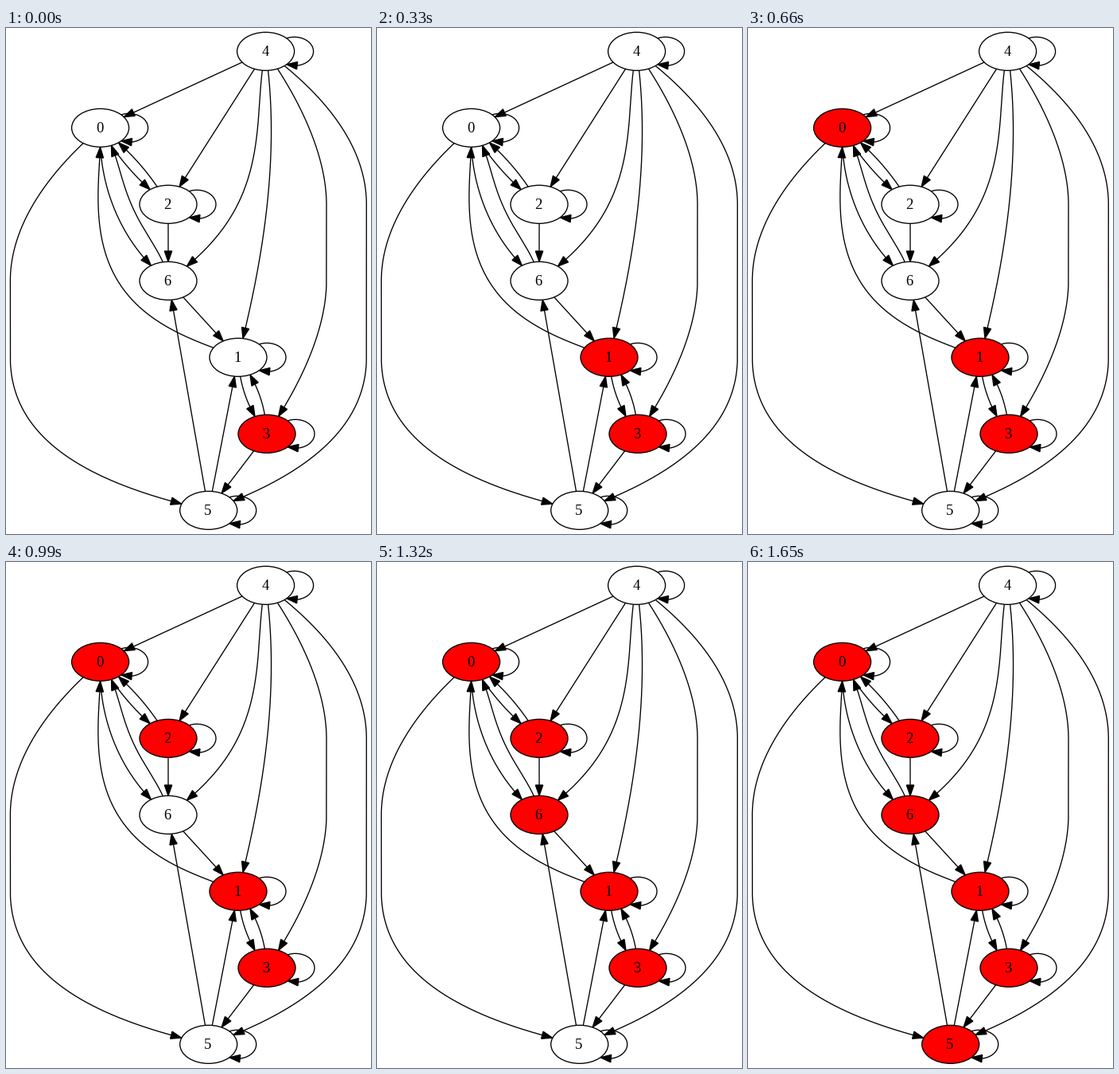
A matplotlib script that plays this animation: 459 by 635 pixels, repeating every 1.98 s.

```python
import numpy as np
import matplotlib.pyplot as plt
from matplotlib.animation import FuncAnimation
from matplotlib.patches import Ellipse, Polygon

W, H, DPI = 459, 635, 64
LINE = 1.5                    # points, 1.33 px
RX, RY = 36, 24
RANK = 96                     # vertical step between nodes
HEAD, HALF = 13.33, 4.67      # arrowhead length and half width

XS = {4: 326.6, 0: 118.6, 2: 204, 6: 204, 1: 292, 3: 328, 5: 254.7}
NODES = {n: np.array([x, 29.33 + RANK * i])
         for i, (n, x) in enumerate(XS.items())}
VISITS = (3, 1, 0, 2, 6, 5)

LOOPED = (4, 0, 2, 1, 3, 5)
DIRECT = [(4, 0), (4, 2), (0, 2), (2, 0), (2, 6), (6, 1),
          (1, 3), (3, 1), (3, 5), (5, 6), (5, 1)]
# Edges that run down a vertical lane at x
LANES = {(4, 3): 403, (4, 5): 453.3, (0, 5): 5.4}
# Edges bent through a few points
BENT = {
    (4, 6): [(315, 138), (283, 236.5), (240, 288)],
    (4, 1): [(333.5, 120), (320, 283)],
    (0, 6): [(124.5, 190), (153.5, 261)],
    (6, 0): [(196, 291), (162, 231), (134, 151)],
    (1, 0): [(199, 373), (147, 327), (117.5, 245)],
}
T = np.linspace(0, 1, 2000)


def through(points):
    """Smooth curve through all points, timed by chord length."""
    pts = np.array(points, float)
    t = np.append(0, np.cumsum(np.hypot(*np.diff(pts, axis=0).T)))
    coef = np.polyfit(t / t[-1], pts, len(pts) - 1)
    return np.column_stack([np.polyval(c, T) for c in coef.T])


def direct(a, b):
    p, q = NODES[a], NODES[b]
    if (b, a) not in DIRECT:
        return through([p, q])
    bow = -9 if p[1] < q[1] else 9
    return through([p, (p + q) / 2 + (bow, 0), q])


def ramp(node, x, way):
    """Bezier from a node into a lane, ending two ranks away."""
    p = NODES[node]
    dx = x - p[0]
    wide = abs(dx)
    ctrl = p + np.array([[0, 0],
                         [0.57 * dx, way * (74 - 0.17 * wide)],
                         [dx, way * (2 * RANK - 40 - 0.27 * wide)],
                         [dx, way * 2 * RANK]])
    basis = [(1 - T) ** 3, 3 * T * (1 - T) ** 2, 3 * T ** 2 * (1 - T), T ** 3]
    return np.transpose(basis) @ ctrl


def lane(a, b, x):
    return np.vstack([ramp(a, x, 1), ramp(b, x, -1)[::-1]])


def loop(node):
    ang = np.radians(150) * (2 * T - 1)
    return NODES[node] + np.column_stack([36 + 24 * np.cos(ang),
                                          18 * np.sin(ang)])


def draw_edge(ax, curve, a, b):
    """Clip the curve to both ovals and put an arrowhead on its end."""
    for n in (a, b):
        curve = curve[np.hypot(*((curve - NODES[n]) / (RX, RY)).T) >= 1]
    tip = curve[-1]
    curve = curve[np.hypot(*(curve - tip).T) >= HEAD]
    back = (curve[-1] - tip) / np.hypot(*(curve[-1] - tip))
    base = tip + HEAD * back
    side = HALF * np.array([-back[1], back[0]])
    ax.plot(*curve.T, color="black", lw=LINE, snap=False,
            solid_capstyle="butt", zorder=2)
    ax.add_patch(Polygon([tip, base + side, base - side], fc="black",
                         ec="black", lw=LINE, joinstyle="miter", zorder=2))


fig = plt.figure(figsize=(W / DPI, H / DPI), dpi=DPI, facecolor="white")
ax = fig.add_axes([0, 0, 1, 1])
ax.axis("off")

ovals = {}
for n, (x, y) in NODES.items():
    ovals[n] = ax.add_patch(Ellipse((x, y), 2 * RX, 2 * RY, fc="white",
                                    ec="black", lw=LINE, zorder=1))
    ax.text(x - 0.8, y + 5.2, str(n), family="Liberation Serif", size=21,
            ha="center", va="baseline", zorder=3)

for n in LOOPED:
    draw_edge(ax, loop(n), n, n)
for a, b in DIRECT:
    draw_edge(ax, direct(a, b), a, b)
for (a, b), x in LANES.items():
    draw_edge(ax, lane(a, b, x), a, b)
for (a, b), via in BENT.items():
    draw_edge(ax, through([NODES[a], *via, NODES[b]]), a, b)
ax.set(xlim=(0, W), ylim=(H, 0))


def update(step):
    seen = VISITS[:step + 1]
    for n, oval in ovals.items():
        oval.set_facecolor("red" if n in seen else "white")
    return list(ovals.values())


anim = FuncAnimation(fig, update, frames=len(VISITS), interval=330,
                     repeat=True, repeat_delay=0, blit=False)
plt.show()
```
